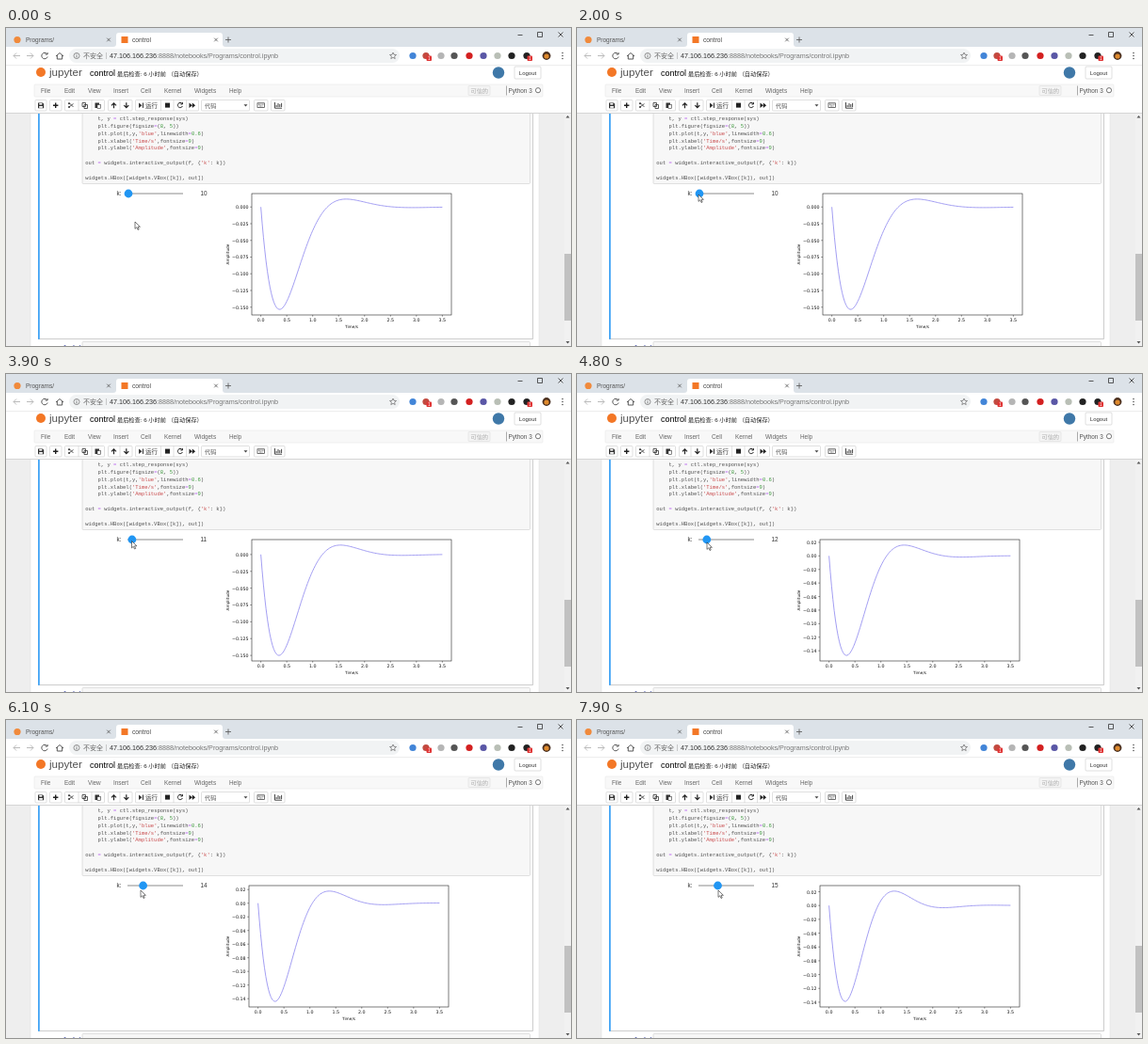
Recreate the animation shown at these times as an HTML page. Size 600 by 338 pixels, loop 8000 ms.

```html
<!DOCTYPE html>
<html lang="zh">
<head>
<meta charset="utf-8">
<style>
html, body { margin: 0; width: 100%; height: 100%; overflow: hidden; background: #fff; }
svg { display: block; width: 600px; height: 338px; font-family: "Liberation Sans", "Noto Sans CJK SC", "Noto Sans CJK", sans-serif; }
text { white-space: pre; }
.code { font-family: "Liberation Mono", monospace; }
.fig { font-family: "DejaVu Sans", sans-serif; }
</style>
</head>
<body>
<svg id="stage" viewBox="0 0 600 338" xmlns="http://www.w3.org/2000/svg"></svg>
<script>
const rect = (x, y, w, h, fill, more = '') => `<rect x="${x}" y="${y}" width="${w}" height="${h}" fill="${fill}" ${more}/>`;
const disc = (x, y, r, fill, more = '') => `<circle cx="${x}" cy="${y}" r="${r}" fill="${fill}" ${more}/>`;
const line = (d, color = '#555', w = 1, more = '') => `<path d="${d}" fill="none" stroke="${color}" stroke-width="${w}" ${more}/>`;
const solid = (d, color = '#333') => `<path d="${d}" fill="${color}"/>`;
const text = (x, y, size, s, fill = '#333', more = '') => `<text x="${x}" y="${y}" font-size="${size}" fill="${fill}" ${more}>${s}</text>`;
const framed = (x, y, w, h, fill = '#fff', edge = '#ccc') =>
  rect(x, y, w, h, fill, `stroke="${edge}" stroke-width=".6" rx="1"`);
const cross = (x, y, r, color = '#555') => line(`M${x - r} ${y - r}l${2 * r} ${2 * r}m0 ${-2 * r}l${-2 * r} ${2 * r}`, color, .8);

function browser() {
  let s = rect(0, 0, 600, 20, '#dce2e8') + rect(0, 20, 600, 20, '#fff');
  s += solid('M114 20q3 0 3-3V8q0-3 3-3h107q3 0 3 3v9q0 3 3 3z', '#fff');
  s += disc(12, 12.5, 3.6, '#f08a3c') + rect(122.5, 9, 7, 7, '#f37726');
  s += text(21, 15, 6.5, 'Programs/', '#555') + text(134, 15, 6.7, 'control', '#444');
  s += cross(109, 12.5, 1.8) + cross(223, 12.5, 1.8) + line('M233 12.5h6m-3-3v6', '#555', .8);
  s += line('M543.5 7.5h5', '#333', .8) + line('M564.5 4.5h5v5h-5z', '#333', .8) + cross(589, 7, 2.5, '#333');
  // navigation
  s += line('M15 29.5h-7m3-3l-3 3l3 3', '#bbb') + line('M22 29.5h7m-3-3l3 3l-3 3', '#bbb');
  s += line('M43.5 27.5a3.2 3.2 0 1 0 .6 3m0-4.5v2h-2.5') + line('M53 30l4-3.5l4 3.5m-6.7-1v4h5.4v-4');
  s += rect(67, 22, 351, 15, '#f1f3f4', 'rx="7.5"');
  s += disc(75, 29.5, 3, 'none', 'stroke="#666" stroke-width=".7"') + line('M75 27.6v.9m0 .6v2.2', '#666', .8);
  s += text(82, 32, 7, '不安全', '#666') + line('M106.5 26v7', '#aaa', .6);
  s += text(110, 32, 7.2, '47.106.166.236<tspan fill="#777">:8888/notebooks/Programs/control.ipynb</tspan>', '#333');
  s += line('M411 26l1 2.3l2.5.2l-1.9 1.7l.6 2.4l-2.2-1.3l-2.2 1.3l.6-2.4l-1.9-1.7l2.5-.2z', '#666', .7);
  [[432, '#4285d8'], [446, '#c24a40'], [462, '#b5b5b5'], [476, '#555'], [492, '#d32020'],
   [507, '#5a57a6'], [522, '#b9bfb6'], [537, '#222'], [553, '#222']].forEach(([x, c]) => s += disc(x, 29.5, 3.6, c));
  [[449, '1'], [556, '1']].forEach(([x, n]) => s += rect(x - 2.5, 29.5, 5.5, 5.5, '#e03434', 'rx="1"') + text(x - 1, 34.2, 4.6, n, '#fff'));
  s += disc(574, 29.5, 4.4, '#4b3020') + disc(574, 30, 2.6, '#df8a2d');
  [26.5, 29.5, 32.5].forEach(y => s += disc(591, y, .8, '#555'));
  return s;
}

function header() {
  let s = rect(0, 39.5, 600, .6, '#ddd') + disc(37, 47, 5, '#f37726');
  s += text(46, 50.5, 11.6, 'jupyter', '#4e4e4e') + text(89, 51, 9, 'control', '#000');
  s += text(118, 50.5, 6.2, '最后检查: 6 小时前 （自动保存）', '#222');
  s += disc(523, 47.5, 6.2, '#3f78a8') + framed(540, 41, 28, 13) + text(554, 49.8, 6, 'Logout', '#333', 'text-anchor="middle"');
  s += framed(30, 60, 540, 13, '#f8f8f8', '#e7e7e7');
  [[37, 'File'], [62, 'Edit'], [87, 'View'], [114, 'Insert'], [143, 'Cell'], [168, 'Kernel'], [200, 'Widgets'], [237, 'Help']]
    .forEach(([x, t]) => s += text(x, 69, 6.4, t, '#666'));
  s += framed(491, 61.5, 23, 10, '#f4f4f4', '#ddd') + text(493.5, 69, 6.2, '可信的', '#aaa');
  s += line('M531.5 61.5v10', '#888', .7) + text(533.5, 68.8, 6.4, 'Python 3', '#555');
  // toolbar
  [[31, 12], [46.5, 12.5], [62.5, 42], [108.5, 25.5], [137.5, 67], [207.5, 51], [263.5, 14.5], [281.5, 14.5]]
    .forEach(([x, w]) => s += framed(x, 76.5, w, 11.5));
  [77, 91, 121, 164.5, 178, 191.5].forEach(x => s += line(`M${x} 76.5v11.5`, '#ccc', .6));
  s += solid('M34 79.5h5l1.2 1.2v4.5h-6.2z') + rect(35.3, 80, 3, 1.6, '#fff') + rect(35.2, 83, 3.7, 1.8, '#fff');
  s += line('M50 82.2h5.4m-2.7-2.7v5.4', '#222', 1.4);
  s += line('M67 79.5l4.5 4.5m0-3.5l-4.5 3.5', '#333', .8) + disc(67, 80.2, 1, '#333') + disc(67, 84, 1, '#333');
  s += line('M81 79.5h3.5v4h-3.5zm2 2h3.5v4h-3.5z', '#333', .8);
  s += solid('M94.5 79.5h4.5v5.5h-4.5z') + rect(97, 81.5, 3.5, 4, '#fff', 'stroke="#333" stroke-width=".6"');
  s += line('M114.5 85.3v-5.4m-2.5 2.5l2.5-2.5l2.5 2.5', '#222', 1.2) + line('M127.8 79.3v5.4m-2.5-2.5l2.5 2.5l2.5-2.5', '#222', 1.2);
  s += solid('M141 79.5l3.5 2.7l-3.5 2.7z') + rect(145, 79.5, 1, 5.4, '#333') + text(148, 84.7, 6.5, '运行');
  s += rect(169, 79.6, 5, 5, '#222') + line('M187 80.4a2.6 2.6 0 1 0 .4 2.6m0-4v2h-2', '#222', 1);
  s += solid('M194.5 79.5l3.3 2.7l-3.3 2.7zm3.3 0l3.3 2.7l-3.3 2.7z', '#222');
  s += text(211, 84.6, 6.2, '代码', '#555') + solid('M252.5 81.2h4l-2 2.2z', '#444');
  s += rect(267, 79.8, 7.6, 4.8, '#fff', 'stroke="#333" stroke-width=".7"') + line('M268 81.2h5.6m-4.6 1.8h3.6', '#333', .8, 'stroke-dasharray=".8 .5"');
  s += line('M285.5 79v6.2h7.5m-5.8-1.2v-2m1.8 2v-4m1.8 4v-3m1.8 3v-4.2', '#333', .9);
  return s + rect(0, 90, 600, .8, '#ccc');
}

const red = t => `<tspan fill="#c8484a">${t}</tspan>`;
const green = t => `<tspan fill="#3c983c">${t}</tspan>`;
const eq = '<tspan fill="#b455f0">=</tspan>';

function notebook() {
  let s = rect(0, 90.5, 600, 248, '#eee') + rect(26, 90.5, 540, 248, '#fff', 'stroke="#ddd" stroke-width=".5"');
  s += line('M34 330.5H559.5V91', '#ababab', .6) + rect(34, 91, 1.8, 239.8, '#42a5f5');
  s += framed(81, 80, 475.5, 85.5, '#f7f7f7', '#cfcfcf');
  [[97.8, `    t, y ${eq} ctl.step_response(sys)`],
   [105.7, `    plt.figure(figsize${eq}(${green(8)}, ${green(5)}))`],
   [113.6, `    plt.plot(t,y,${red("'blue'")},linewidth${eq}${green('0.6')})`],
   [121.5, `    plt.xlabel(${red("'Time/s'")},fontsize${eq}${green(9)})`],
   [129.4, `    plt.ylabel(${red("'Amplitude'")},fontsize${eq}${green(9)})`],
   [145.1, `out ${eq} widgets.interactive_output(f, {${red("'k'")}: k})`],
   [160.8, 'widgets.HBox([widgets.VBox([k]), out])']]
    .forEach(([y, t]) => s += text(84.3, y, 5.53, t, '#505050', 'class="code"'));
  s += framed(81, 333.5, 475.5, 12, '#f7f7f7', '#cfcfcf') + text(61, 341, 5.3, 'In [ ]:', '#303f9f', 'class="code"');
  s += rect(593, 90.5, 7, 248, '#f1f1f1') + rect(593, 240, 7, 71, '#c1c1c1');
  s += solid('M594.5 95.5l2-2.4l2 2.4z', '#555') + solid('M594.5 333l2 2.4l2-2.4z', '#555');
  return s + text(117.5, 178.3, 6.4, 'k:') + rect(129, 175.5, 59, 1, '#8c8c8c');
}

// Step response of the loop s^2 + 4s + k.
function plot(k) {
  const w = Math.sqrt(k - 4), f = t => -Math.exp(-2 * t) * Math.sin(w * t) / w;
  const tMin = Math.atan(w / 2) / w, min = f(tMin), max = f(tMin + Math.PI / w);
  const fine = k < 12, step = fine ? .025 : .02, left = fine ? 261 : 258;
  const top = 176, wide = 212, high = 129;
  const px = t => left + wide * (.05 + t / 3.5) / 1.1;
  const py = v => top + high * (.05 + (max - v) / (max - min)) / 1.1;
  const pad = (max - min) * .05;
  let s = rect(left, top, wide, high, '#fff', 'stroke="#222" stroke-width=".6"');
  for (let i = Math.ceil((min - pad) / step); i * step <= max + pad; i++) {
    const y = py(i * step);
    s += line(`M${left} ${y}h-1.7`, '#222', .5);
    s += text(left - 3.4, y + 2, 4.75, (i * step).toFixed(fine ? 3 : 2).replace('-', '−'), '#111', 'text-anchor="end"');
  }
  for (let t = 0; t <= 3.5; t += .5) {
    s += line(`M${px(t)} 305v1.7`, '#222', .5);
    s += text(px(t), 312.2, 4.75, t.toFixed(1), '#111', 'text-anchor="middle"');
  }
  s += text(left + wide / 2, 318.6, 4.28, 'Time/s', '#111', 'text-anchor="middle"');
  s += text(0, 0, 4.28, 'Amplitude', '#111', 'text-anchor="middle" transform="translate(237.2 240.5) rotate(-90)"');
  let d = '';
  for (let i = 0; i <= 140; i++) d += `${i ? 'L' : 'M'}${px(i / 40).toFixed(2)} ${py(f(i / 40)).toFixed(2)}`;
  return `<g class="fig">${s}${line(d, '#938df0', .85)}</g>`;
}

const stage = document.getElementById('stage');
stage.innerHTML = browser() + notebook() + rect(0, 40, 600, 50.5, '#fff') + header() +
  disc(565, 66.2, 2.6, '#fff', 'id="kernel" stroke="#555" stroke-width=".8"') +
  '<g id="figure"></g>' + disc(130, 176, 4.4, '#2196f3', 'id="knob"') + text(206.5, 178.3, 6.4, '10', '#333', 'id="value"') +
  '<path id="cursor" d="M0 0v7.4l1.8-1.6l1.2 2.7l1.2-.5l-1.2-2.7h2.4z" fill="#fff" stroke="#222" stroke-width=".6"/>';
const [kernel, figure, knob, value, cursor] = ['kernel', 'figure', 'knob', 'value', 'cursor'].map(id => document.getElementById(id));

const path = [[0, 137, 206], [200, 137, 206], [1200, 129, 178], [2000, 129, 177], [3200, 132, 177],
  [3900, 133.5, 177.5], [4800, 138, 179], [6100, 143, 181], [7900, 150, 181], [8000, 150, 181]];
const slideAt = [2800, 4200, 5000, 6000, 7000];
const drawAt = [3750, 4650, 5300, 6600, 7500];
const count = (times, t) => 10 + times.filter(x => t >= x).length;
let shown = 0;

function frame(now) {
  const t = now % 8000;
  const i = path.findIndex(p => p[0] > t), a = path[i - 1], b = path[i];
  const u = (t - a[0]) / (b[0] - a[0]);
  cursor.setAttribute('transform', `translate(${a[1] + (b[1] - a[1]) * u} ${a[2] + (b[2] - a[2]) * u})`);
  const k = count(slideAt, t), drawn = count(drawAt, t);
  // the kernel turns busy shortly after a new value and stays so until the redraw
  const busy = count(slideAt, t - 150) > drawn;
  knob.setAttribute('cx', 130 + (k - 10) * 3.9);
  value.textContent = k;
  kernel.setAttribute('fill', busy ? '#555' : '#fff');
  if (drawn !== shown) figure.innerHTML = plot(shown = drawn);
  requestAnimationFrame(frame);
}
frame(0);
</script>
</body>
</html>
```
